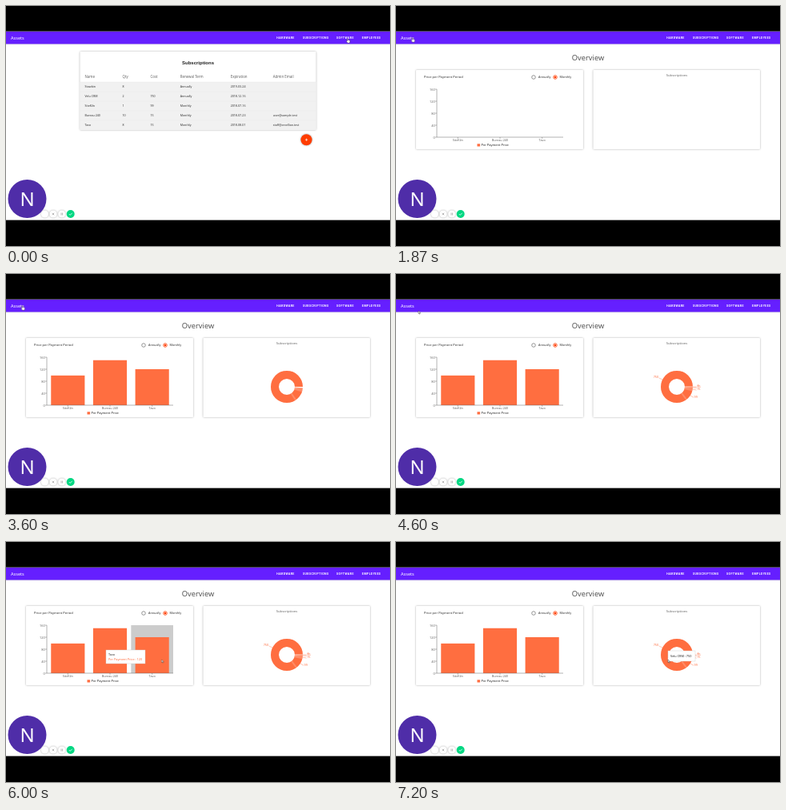
Animation, 480 px wide and 300 px high, one loop 7.39 s. Source, as an HTML page:

```html
<!DOCTYPE html>
<html lang="en">
<head>
<meta charset="utf-8">
<title>Assets</title>
<style>
html, body { margin: 0; width: 100%; height: 100%; overflow: hidden; background: #fff; }
svg { display: block; width: 480px; height: 300px; font: 3.8px "Noto Sans", "Open Sans", sans-serif; }
.nav { font: 700 3.6px Roboto, sans-serif; letter-spacing: .38px; fill: #fff; }
.card { fill: #fff; filter: drop-shadow(0 .6px .8px #0005); }
.tip { fill: #fff; stroke: #ccc; stroke-width: .4; }
.grey { fill: #666; }
.dark { fill: #333; }
.orange { fill: #ff6e40; }
.mid { text-anchor: middle; }

/* 1% = 73.9 ms */
.list, .overview, .labels, .band, .tips, .pietip, .hand, .arrow { animation: 7390ms step-end infinite; }
.list { animation-name: list; }
.overview { animation-name: overview; }
.labels { animation-name: labels; }
.band1 { animation-name: band1; }
.band2 { animation-name: band2; }
.band3 { animation-name: band3; }
.hand { animation-name: hand; }
.arrow { animation-name: arrow; }
@keyframes list { 0% { opacity: 1 } 22.6%, 100% { opacity: 0 } }
@keyframes overview { 0% { opacity: 0 } 22.6%, 100% { opacity: 1 } }
@keyframes labels { 0% { opacity: 0 } 52.3%, 100% { opacity: 1 } }
@keyframes band1 { 0%, 72.17%, 100% { opacity: 0 } 71.45% { opacity: 1 } }
@keyframes band2 { 0%, 78.89%, 100% { opacity: 0 } 72.17% { opacity: 1 } }
@keyframes band3 { 0%, 85.93%, 100% { opacity: 0 } 78.89% { opacity: 1 } }
@keyframes hand { 0%, 19.6% { opacity: 1 } 11.77%, 61%, 100% { opacity: 0 } }
@keyframes arrow { 0%, 19.6% { opacity: 0 } 11.77%, 61%, 100% { opacity: 1 } }

.bar { transform-origin: 0 164px; animation: grow 7390ms infinite; }
@keyframes grow {
  0%, 25.71% { transform: scaleY(0); animation-timing-function: ease; }
  31.12%, 100% { transform: none; }
}
.ring { fill: none; stroke: #ff6e40; stroke-width: 10; stroke-dasharray: 360 400; animation: sweep 7390ms infinite; }
@keyframes sweep {
  0%, 31.12% { stroke-dashoffset: 360; animation-timing-function: ease; }
  51.42%, 100% { stroke-dashoffset: 0; }
}
.cut { stroke: #fff; stroke-width: .4; animation: turn 7390ms infinite; }
@keyframes turn {
  0%, 31.12% { transform: rotate(0deg); animation-timing-function: ease; }
  51.42%, 100% { transform: rotate(var(--a)); }
}
.tips { animation: tips 7390ms linear infinite; }
@keyframes tips {
  0%, 71.4% { transform: translate(40px, 96px); }
  73.07% { transform: translate(60px, 107px); animation-timing-function: ease-out; }
  76.45%, 78.89% { transform: translate(138px, 135px); animation-timing-function: ease-out; }
  81.1%, 100% { transform: translate(125px, 135px); }
}
.pietip { animation: pietip 7390ms ease infinite; }
@keyframes pietip {
  0%, 92.95% { opacity: 0; transform: translate(320px, 122px); }
  92.96% { opacity: 1; transform: translate(320px, 122px); }
  96.75%, 100% { opacity: 1; transform: translate(340px, 136px); }
}
.cursor { animation: move 7390ms linear infinite; }
@keyframes move {
  0%, 8.12% { transform: translate(426px, 40px); }
  9.07% { transform: translate(395px, 42px); }
  9.88%, 11.77% { transform: translate(323px, 44px); animation-timing-function: ease-in-out; }
  20.7%, 58.59% { transform: translate(19.5px, 39px); }
  62.25%, 67.66% { transform: translate(28px, 46px); }
  73.07%, 77.13% { transform: translate(118.5px, 129.5px); }
  80.78%, 84.84% { transform: translate(194.5px, 147px); animation-timing-function: ease-in-out; }
  93.37%, 100% { transform: translate(340px, 147px); }
}
</style>
</head>
<body>
<svg viewBox="0 0 480 300">
  <rect width="480" height="300" fill="#fff"/>

  <g class="list">
    <rect class="card" x="92.5" y="57" width="295" height="98" rx="1"/>
    <rect x="92.5" y="95" width="295" height="60" fill="#f1f1f1"/>
    <text class="mid" x="240" y="73.4" style="font: 700 6px 'Liberation Sans', sans-serif" fill="#222">Subscriptions</text>
    <g id="table"></g>
    <circle cx="375.5" cy="167.2" r="7" fill="#ff3d00" style="filter: drop-shadow(0 .8px 1px #0006)"/>
    <path d="M374 167.2h3.2M375.6 165.6v3.2" stroke="#fff" stroke-width=".7"/>
  </g>

  <g class="overview">
    <text class="mid" x="240" y="67.5" font-size="9.3" fill="#555">Overview</text>
    <rect class="card" x="25" y="80" width="209" height="99" rx="1"/>
    <rect class="card" x="246.5" y="80" width="208.5" height="99" rx="1"/>
    <text class="dark" x="35" y="90" font-size="4.1">Price per Payment Period</text>
    <text class="mid grey" x="351" y="88" font-size="4.2">Subscriptions</text>
    <circle cx="172" cy="89" r="2.3" fill="none" stroke="#555" stroke-width=".6"/>
    <text class="dark" x="178" y="90.4">Annually</text>
    <circle cx="199" cy="89" r="2.3" fill="none" stroke="#ff3d00" stroke-width=".8"/>
    <circle cx="199" cy="89" r="1.3" fill="#ff3d00"/>
    <text class="dark" x="204.5" y="90.4">Monthly</text>
    <g id="chart"></g>
    <rect class="orange" x="101.5" y="172.3" width="3.6" height="3.2"/>
    <text x="106.5" y="175.4" font-size="4" fill="#222">Per Payment Price</text>

    <g transform="translate(351 141)">
      <circle class="ring" r="15" pathLength="360" transform="scale(1 -1)"/>
      <g id="cuts"></g>
      <g class="labels orange" id="labels"></g>
    </g>
    <g class="tips" id="tips"></g>
    <g class="pietip">
      <rect class="tip" width="34" height="13"/>
      <text x="3" y="7.9" fill="#222">Velu CRM : 750</text>
    </g>
  </g>

  <rect y="32" width="480" height="15.5" fill="#651fff"/>
  <rect y="47.5" width="480" height=".7" fill="#0002"/>
  <text x="6" y="42" font-size="5.6" font-weight="500" fill="#fff">Assets</text>
  <g class="nav">
    <text x="338.3" y="41">HARDWARE</text>
    <text x="371" y="41">SUBSCRIPTIONS</text>
    <text x="413" y="41">SOFTWARE</text>
    <text x="445" y="41">EMPLOYEES</text>
  </g>

  <g class="card">
    <circle cx="48.5" cy="260" r="4.6"/>
    <circle cx="59" cy="260" r="4.6"/>
    <circle cx="69.8" cy="260" r="4.6"/>
  </g>
  <path d="M57.8 258.8l2.4 2.4m0-2.4l-2.4 2.4M69 258.5v3M70.6 258.5v3" stroke="#888" stroke-width=".6"/>
  <circle cx="80.7" cy="260" r="5" fill="#00d782"/>
  <path d="M78.8 260l1.4 1.4 2.5-2.6" fill="none" stroke="#fff" stroke-width=".8"/>
  <circle cx="26.5" cy="241" r="24" fill="#4f2da8"/>
  <text class="mid" x="26.5" y="249.6" font-size="24" fill="#fff">N</text>

  <rect width="480" height="31.7" fill="#000"/>
  <rect y="267.6" width="480" height="32.4" fill="#000"/>

  <g class="cursor" fill="#fff" stroke="#222" stroke-width=".4">
    <path class="hand" d="M.6 3.8V.8q.5-.8 1 0v1.7l2 .6q.6.3.4 1.2l-.5 2H1.2L-.6 4.3q0-.8.7-.5z"/>
    <path class="arrow" d="M0 0v3.6l.9-.8.6 1.4.6-.3-.6-1.3h1.1z"/>
  </g>
</svg>
<script>
const put = (id, html) => document.getElementById(id).innerHTML = html;
const text = (x, y, s, more = '') => `<text x="${x}" y="${y}" ${more}>${s}</text>`;

const cols = [98.5, 145.5, 180.5, 217.7, 280.7, 333.7];
const heads = ['Name', 'Qty', 'Cost', 'Renewal Term', 'Expiration', 'Admin Email'];
const rows = [
  ['Stowbin', 8, '', 'Annually', '2019-03-24', ''],
  ['Velu CRM', 2, 750, 'Annually', '2018-12-16', ''],
  ['SiteKiln', 1, 99, 'Monthly', '2018-07-16', ''],
  ['Bureau 240', 10, 15, 'Monthly', '2018-07-23', 'user@sample.test'],
  ['Tavo', 8, 15, 'Monthly', '2018-08-01', 'staff@orvellian.test']
];
put('table',
  heads.map((h, i) => text(cols[i], 90, h, 'class="grey" font-size="4.4"')).join('') +
  rows.map((row, r) =>
    `<path d="M92.5 ${95 + 12 * r}h295" stroke="#e2e2e2" stroke-width=".4"/>` +
    row.map((s, i) => text(cols[i], 102.3 + 12 * r, s, 'class="dark" font-size="3.6"')).join('')
  ).join(''));

const bars = [['SiteKiln', 99], ['Bureau 240', 150], ['Tavo', 120]];
const band = 158 / 3;
put('chart',
  bars.map(([name, v], i) => {
    const x = 51 + band * i, h = v * 60 / 160;
    return `<rect class="band band${i + 1}" x="${x}" y="104" width="${band}" height="60" fill="#ccc"/>` +
      `<rect class="bar orange" x="${x + band * .1}" y="${164 - h}" width="${band * .8}" height="${h}"/>` +
      `<path d="M${x + band / 2} 164v1.8" stroke="#666" stroke-width=".5"/>` +
      text(x + band / 2, 169.2, name, 'class="mid grey"');
  }).join('') +
  '<path d="M51 104v60h158" fill="none" stroke="#666" stroke-width=".5"/>' +
  [0, 40, 80, 120, 160].map(v => {
    const y = 164 - v * 60 / 160;
    return `<path d="M51 ${y}h-1.8" stroke="#666" stroke-width=".5"/>` +
      text(48.8, y + 1.7, v, 'class="grey" text-anchor="end" font-size="4"');
  }).join(''));

put('tips', bars.map(([name, v], i) =>
  `<g class="band band${i + 1}"><rect class="tip" width="49" height="17"/>` +
  text(3, 6.8, name, 'class="dark"') +
  text(3, 12.8, 'Per Payment Price : ' + v, 'class="orange"') + '</g>').join(''));

// Shares of the ring, counter-clockwise from the right
const shares = [750, 99, 15, 15, 0];
const total = shares.reduce((a, b) => a + b);
let end = 0, cuts = '', labels = '';
for (const v of shares) {
  const size = v / total * 360, mid = (end + size / 2) * Math.PI / 180;
  const c = Math.cos(mid), s = -Math.sin(mid);
  end += size;
  cuts += `<path class="cut" style="--a: ${-end}deg" d="M9.8 0h10.4"/>`;
  labels += `<path d="M${20 * c} ${20 * s}L${25 * c} ${25 * s}" stroke="#ff6e40" stroke-width=".4"/>` +
    text(25.5 * c, 25.5 * s, v, `text-anchor="${c < 0 ? 'end' : 'start'}"`);
}
put('cuts', cuts);
put('labels', labels);
</script>
</body>
</html>
```
